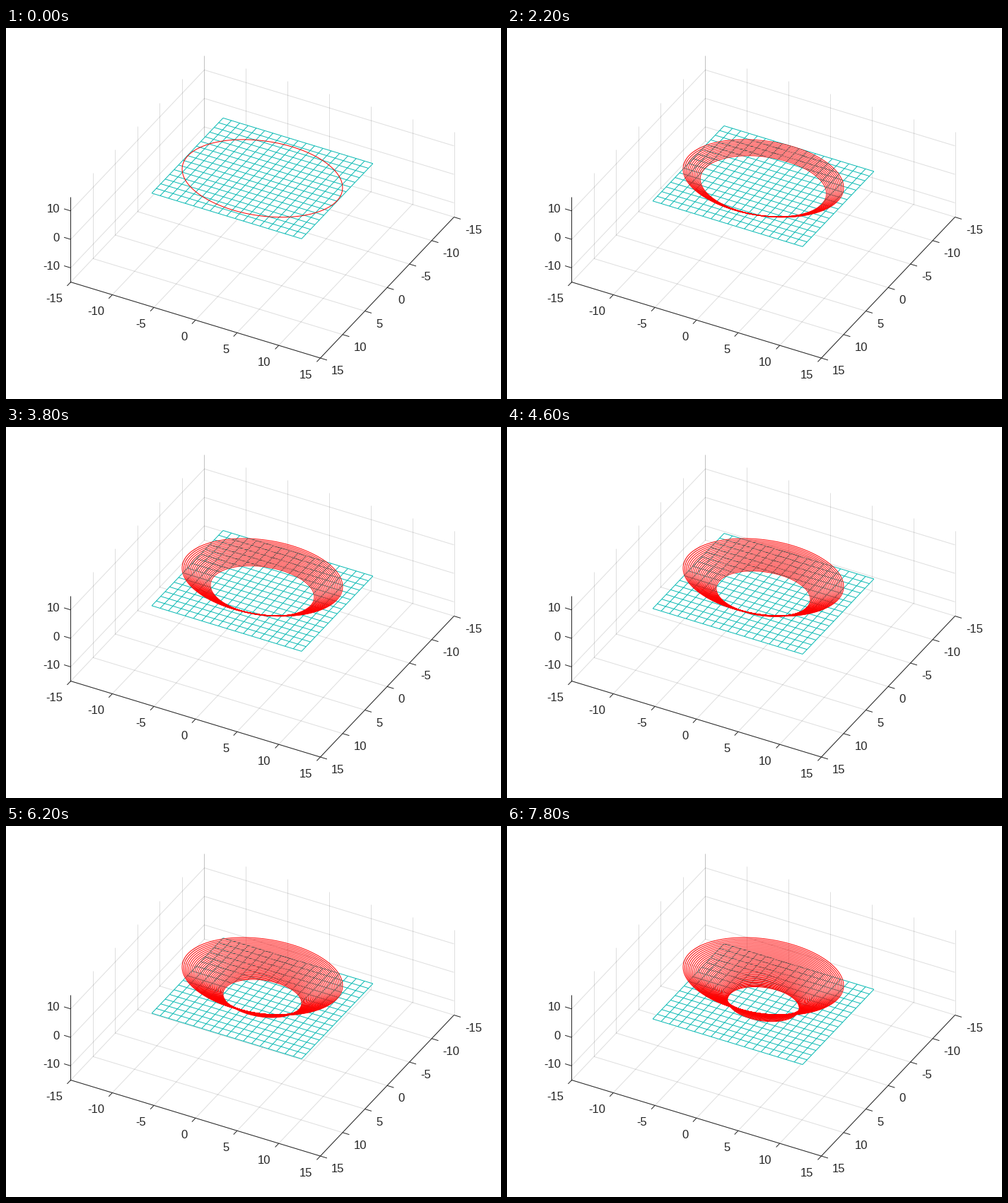
A matplotlib script that plays this animation: 700 by 525 pixels, repeating every 8 s.

```python
import numpy as np
import matplotlib.pyplot as plt
from matplotlib.animation import FuncAnimation
from matplotlib.collections import LineCollection
from matplotlib.patches import Polygon

W, H, DPI = 700, 525, 100
PX = 72 / DPI                      # one pixel in points
STEPS, STEP_MS = 40, 200
LIM = 15
ORIGIN = np.array([362.5, 253.1])
BASIS = np.array([[11.767, 3.583], [-6.3, 6.65], [0, -4.03]])
DARK, TEAL, RED = "#262626", "#0cbab4", "#ff0000"

plt.rcParams["font.family"] = "Liberation Sans"
fig = plt.figure(figsize=(W / DPI, H / DPI), dpi=DPI, facecolor="white")
ax = fig.add_axes([0, 0, 1, 1])
ax.set_xlim(0, W)
ax.set_ylim(H, 0)
ax.axis("off")


def project(x, y, z):
    """Orthographic view: data coordinates to stage pixels."""
    pts = np.stack(np.broadcast_arrays(x, y, z), axis=-1).astype(float)
    return ORIGIN + pts @ BASIS


def segment(a, b, color=DARK, alpha=1.0, order=1):
    p, q = project(*a), project(*b)
    ax.plot([p[0], q[0]], [p[1], q[1]], color=color, alpha=alpha,
            lw=PX, solid_capstyle="butt", zorder=order)


def label(value, at, dx, dy, ha):
    x, y = project(*at)
    ax.text(x + dx, y + dy + 6, str(value), ha=ha, va="baseline",
            fontsize=16.67 * PX, color=DARK, zorder=2)


def grid(a, b):
    segment(a, b, DARK, 0.15, 0)


def draw_box():
    tick = 0.8
    for v in range(-LIM, LIM + 1, 5):
        grid((v, -LIM, -LIM), (v, LIM, -LIM))
        grid((-LIM, v, -LIM), (LIM, v, -LIM))
        grid((v, -LIM, -LIM), (v, -LIM, LIM))
        grid((-LIM, v, -LIM), (-LIM, v, LIM))
        at_x, at_y = (v, LIM, -LIM), (LIM, v, -LIM)
        segment(at_x, (v, LIM + tick, -LIM))
        segment(at_y, (LIM + tick, v, -LIM))
        label(v, at_x, -11.5, 22.5, "right")
        label(v, at_y, 15.5, 17, "left")
    for v in (-10, 0, 10):
        grid((-LIM, -LIM, v), (LIM, -LIM, v))
        grid((-LIM, -LIM, v), (-LIM, LIM, v))
        at_z = (-LIM, LIM, v)
        segment(at_z, (-LIM - tick, LIM, v))
        label(v, at_z, -15.5, -3.5, "right")
    corner = (-LIM, LIM, -LIM)
    segment(corner, (LIM, LIM, -LIM))
    segment((LIM, -LIM, -LIM), (LIM, LIM, -LIM))
    segment(corner, (-LIM, LIM, LIM))


def height(k):
    return 10 - 0.25 * k


def ring(z):
    """Slice of the hyperboloid x²/16 + y²/9 - z²/25 = 1."""
    t = np.linspace(0, 2 * np.pi, 201)
    s = np.sqrt(1 + z * z / 25)
    return project(4 * s * np.cos(t), 3 * s * np.sin(t), z)


def mesh(z, nx=9, ny=8):
    along_y = [project(np.array([x, x]), np.array([-ny, ny]), z)
               for x in range(-nx, nx + 1)]
    along_x = [project(np.array([-nx, nx]), np.array([y, y]), z)
               for y in range(-ny, ny + 1)]
    return along_y + along_x


def sheet(z, nx=9, ny=8):
    return project(np.array([-nx, nx, nx, -nx]),
                   np.array([-ny, -ny, ny, ny]), z)


draw_box()
rings = [ring(height(k)) for k in range(STEPS)]
face = ax.add_patch(Polygon(sheet(height(0)), fc="white", ec="none", zorder=3))
wires = ax.add_collection(
    LineCollection([], colors=TEAL, linewidths=PX, zorder=4), autolim=False)
curves = ax.add_collection(
    LineCollection([], colors=RED, linewidths=PX, zorder=5), autolim=False)


def update(k):
    z = height(k)
    face.set_xy(sheet(z))
    wires.set_segments(mesh(z))
    curves.set_segments(rings[:k + 1])
    return face, wires, curves


anim = FuncAnimation(fig, update, frames=STEPS, interval=STEP_MS,
                     init_func=lambda: update(0), repeat=True,
                     repeat_delay=0, blit=False)
plt.show()
```
